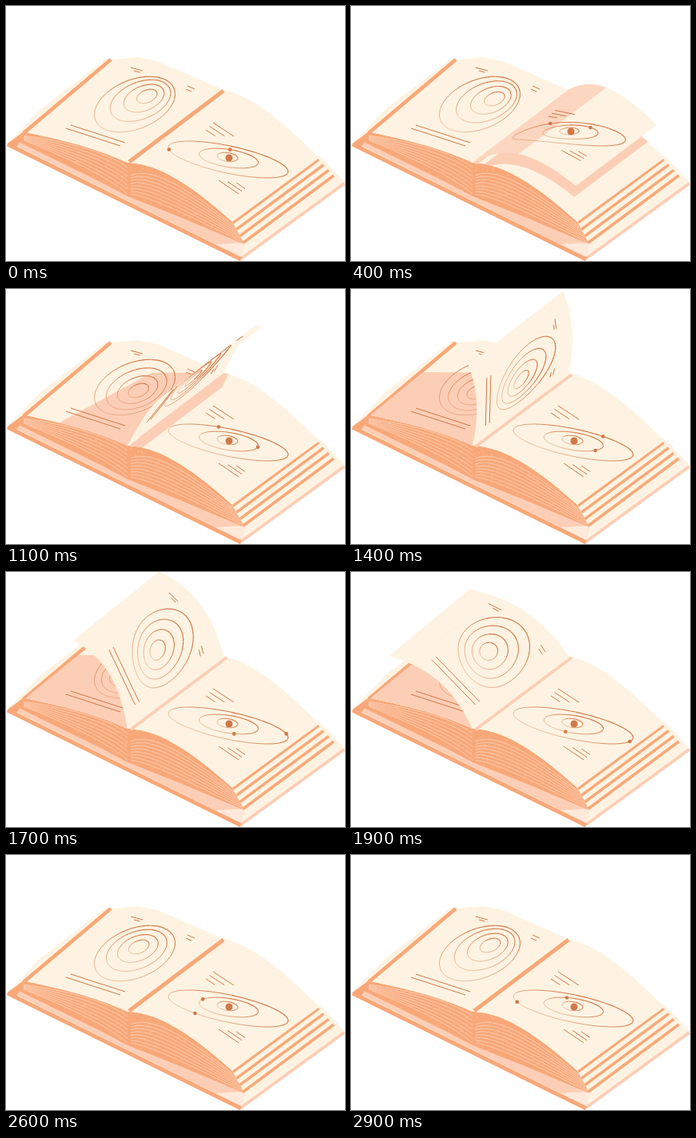
Animation of 424x319 px, one loop 3 s. Source, as an HTML page with a canvas:

```html
<!DOCTYPE html>
<html lang="en">
<head>
<meta charset="utf-8">
<title>Turning page</title>
<style>
  html, body { margin: 0; width: 100%; height: 100%; overflow: hidden; background: #fff; }
  canvas { display: block; width: 424px; height: 319px; }
</style>
</head>
<body>
<canvas id="stage" width="424" height="319"></canvas>
<script>
const ctx = document.getElementById('stage').getContext('2d');
const CREAM = '#fef3e2', ORANGE = '#f8a878', PEACH = '#fcceb6', GLOW = '#fcd6c0', INK = '#d07848';
const LOOP = 3000, STEP = 100, LANDED = 2.1;
const { sin, cos, PI, abs, min, max } = Math;
const RAD = PI / 180;
const FOOT = [152, 196], HEAD = [272, 105];

const range = n => Array.from({ length: n + 1 }, (_, i) => i / n);
const mix = (a, b, k) => a.map((n, i) => n + (b[i] - n) * k);

// The page swings about the spine, speeding up, and bows upwards on the way.
function bend(t) {
  const a = t >= LANDED ? PI : (50 * t + 8.1 * t ** 3) * RAD;
  const s = sin(a), c = cos(a), done = a / PI;
  const reach = abs(c) * (1 + .08 * sin(2 * a));
  const flat = c >= 0 ? [131, 74] : [-128, -38];
  const x = flat[0] * reach, y = flat[1] * reach - (100 + 30 * c * c) * s;
  const bow = 24 - 17 * done + 26 * abs(sin(2 * a));
  const wave = sin(3 * a);
  return {
    knots: [[0, 0], [.2 * x + 8 * s, .2 * y - .55 * bow], [.45 * x + 12 * s, .45 * y - bow], [x, y]],
    side: [109 - 9 * wave, -80 - 11 * done + 6 * wave],
    slip: 1 + .8 * s * done,
    sink: 1 - .1 * s
  };
}

const depth = (p, u) => mix([120, -91], p.side, u);

function at(p, u, v) {
  const k = 1 - u, d = depth(p, u);
  const w = [k ** 3, 3 * k * k * u, 3 * k * u * u, u ** 3];
  return FOOT.map((f, i) => p.knots.reduce((sum, q, j) => sum + w[j] * q[i], f) + v * d[i]);
}

const RIGHT = bend(0), LEFT = bend(LANDED);

// carries a point of a flat page to its place on a bent one
function warp(pt, flat, bent) {
  if (flat === bent) return pt;
  const way = flat === RIGHT ? 1 : -1;
  let lo = 0, hi = 1;
  for (let i = 0; i < 16; i++) {
    const u = (lo + hi) / 2, d = depth(flat, u), b = at(flat, u, 0);
    if ((d[0] * (pt[1] - b[1]) - d[1] * (pt[0] - b[0])) * way > 0) lo = u; else hi = u;
  }
  const v = (pt[0] - at(flat, lo, 0)[0]) / depth(flat, lo)[0];
  return at(bent, lo ** bent.slip, v * bent.sink);
}

function trace(pts) {
  ctx.beginPath();
  pts.forEach(p => ctx.lineTo(p[0], p[1]));
}
function fill(pts, color) {
  trace(pts);
  ctx.closePath();
  ctx.fillStyle = color;
  ctx.fill();
}
function line(pts, color, width) {
  trace(pts);
  ctx.strokeStyle = color;
  ctx.lineWidth = width;
  ctx.stroke();
}
function curve(a, b, c, color, width) {
  line(range(16).map(k => mix(mix(a, b, k), mix(b, c, k), k)), color, width);
}
function clipped(pts, draw) {
  ctx.save();
  trace(pts);
  ctx.clip();
  draw();
  ctx.restore();
}

const edge = (p, v) => range(20).map(u => at(p, u, v));
const outline = p => [...edge(p, 0), ...edge(p, 1).reverse()];

const rightPage = outline(RIGHT);
const leftPage = [...edge(LEFT, 0), [133, 67], [165, 64], [190, 69], HEAD];
const leftFan = [...edge(LEFT, 0).reverse(), [152, 238], [120, 221], [12, 168]];
const rightFan = [...edge(RIGHT, 0), [298, 298], [220, 265], [152, 238]];

function onEllipse([cx, cy, rx, ry, rot], deg) {
  const x = rx * cos(deg * RAD), y = ry * sin(deg * RAD);
  const c = cos(rot * RAD), s = sin(rot * RAD);
  return [cx + x * c - y * s, cy + x * s + y * c];
}

// pen line that thins towards the lower left
function ellipse(shape, put) {
  const pts = range(60).map(k => put(onEllipse(shape, k * 360)));
  for (let i = 0; i < 60; i++) {
    line([pts[i], pts[i + 1]], INK, .8 - .4 * cos((i * 6 - 140) * RAD));
  }
}
function dot(p, r) {
  ctx.beginPath();
  ctx.arc(p[0], p[1], r, 0, 7);
  ctx.fillStyle = INK;
  ctx.fill();
}
function hatch(put, [x, y], [dx, dy], [ox, oy], n, shrink) {
  for (let i = 0; i < n; i++) {
    const k = 1 - shrink * i, a = x + ox * i, b = y + oy * i;
    line([put([a, b]), put([a + dx * k, b + dy * k])], INK, 1);
  }
}

function drawRings(t, page) {
  const put = p => warp(p, LEFT, page);
  const a = (t - .2) / 3 * 2 * PI;
  const dx = 5 + 13 * cos(a) + 4 * sin(a), dy = -2 - 7 * cos(a) + 4 * sin(a);
  for (let i = 0; i < 4; i++) {
    const k = (i / 3) ** .7, r = 53 - 13.2 * i;
    ellipse([161 + dx * k, 123 + dy * k, r, r * .58, -22], put);
  }
  hatch(put, [156, 77], [15, 4], [4, 4], 2, .5);
  hatch(put, [227, 100], [9, 4], [-2, 4], 2, .2);
  hatch(put, [81, 149], [68, 22], [-6, 4], 2, 0);
}

function drawOrbits(page, outer, inner) {
  const put = p => warp(p, RIGHT, page);
  const wide = [278, 192, 76.5, 17, 12], mid = [278.5, 190.5, 37.5, 11, 9];
  ellipse(wide, put);
  ellipse(mid, put);
  ellipse([277, 189, 13, 5.5, 8], put);
  dot(put([279, 190]), 4.5);
  dot(put(onEllipse(wide, outer)), 2.3);
  dot(put(onEllipse(mid, inner)), 2.3);
  hatch(put, [259, 146], [26, 17], [-4.5, 4.5], 3, .28);
  hatch(put, [266, 218], [25, 17], [11, 1.5], 3, .28);
}

function speckle(area, [x, y, w, h], count, color, seed) {
  let s = seed * 7919 + 17;
  const rnd = () => (s = (s * 16807) % 2147483647) / 2147483647;
  clipped(area, () => {
    ctx.fillStyle = color;
    for (let i = 0; i < count; i++) ctx.fillRect(x + rnd() * w, y + rnd() * h, 1, 1);
  });
}

function drawCover(step) {
  const band = [[3, 170], [24, 160], [152, 225], [298, 292], [294, 314]];
  fill([[1, 173], [42, 130], [125, 66], [132, 66], [272, 120], [395, 190], [424, 221], [293, 317]], CREAM);
  fill(band, PEACH);
  speckle(band, [0, 160, 300, 155], 420, '#fde0d0', step + 1);
  fill([[262, 298], [299, 296], [295, 314]], '#fee9da');
  line([[294, 316], [423, 222]], PEACH, 4);
  line([[2, 173], [294, 317]], ORANGE, 5);
  fill([[1, 173], [26, 154], [24, 160], [13, 176]], ORANGE);
}

function drawBlock(step) {
  fill([[283, 269], [392, 189], [411, 212], [298, 298]], CREAM);
  for (const k of range(3)) {
    line([mix([284, 271], [297, 296], k), mix([391, 192], [410, 212], k)], ORANGE, 3.6);
  }
  fill(leftFan, ORANGE);
  fill(rightFan, ORANGE);
  clipped(leftFan, () => {
    for (let i = 0; i < 7; i++) curve([22, 162 + i], [118, 176 + i * 5], [152, 202 + i * 5.5], PEACH, .9);
  });
  clipped(rightFan, () => {
    for (let i = 0; i < 8; i++) curve([156, 212 + i * 3.4], [190 - i * 2, 196 + i * 5.5], [285 + i * 1.6, 275 + i * 3], PEACH, .9);
  });
  speckle(leftFan, [10, 156, 145, 84], 170, '#fbc7a6', step + 40);
  speckle(rightFan, [150, 194, 150, 106], 260, '#fbc7a6', step + 80);
}

function drawShadows(t, page) {
  const k = min(1, max(0, t - .4));
  const near = mix(FOOT, [24, 158], k), far = mix(HEAD, [90, 104], k * k);
  clipped(leftPage, () => fill([FOOT, near, far, HEAD], PEACH));
  if (t < 1.2) {
    const drop = min(18, t * 36);
    clipped(rightPage, () => fill(outline(page).map(([x, y]) => [x - 2, y + drop]), PEACH));
  }
}

function drawTurning(t, page) {
  const n = 32;
  for (let i = 0; i < n; i++) {
    const u = i / n, next = u + 1 / n;
    const color = t < 1.1 && u < t * 1.4 ? GLOW : CREAM;
    const strip = [at(page, u, 0), at(page, next, 0), at(page, next, 1), at(page, u, 1)];
    fill(strip, color);
    line([...strip, strip[0]], color, .6);
  }
  const [x, y] = page.knots[3];
  if (120 * y + 91 * x > 0) drawOrbits(page, 169 + 195 * t, 270 + 110 * t);
  else drawRings(t, page);
}

function draw(step) {
  const t = step * STEP / 1000, moving = t > 0 && t < LANDED;
  const page = bend(t);
  ctx.clearRect(0, 0, 424, 319);
  ctx.lineJoin = 'round';
  drawCover(step);
  drawBlock(step);
  fill(rightPage, CREAM);
  fill(leftPage, CREAM);
  line([[22, 159], [131, 67]], ORANGE, 4.5);

  if (moving) drawShadows(t, page);
  drawRings(t, LEFT);
  if (!moving || t >= .5) {
    const outer = 169 + 120 * t - 43 * max(0, sin(PI * t / 2.25));
    drawOrbits(RIGHT, outer, 270 + 120 * t - 38 * sin(PI * t / 3));
  }
  if (moving) {
    line([[156, 197], [276, 107]], PEACH, 4);
    drawTurning(t, page);
  } else {
    line([[154, 195], [272, 106]], ORANGE, 5);
  }
}

let shown = -1;
function tick() {
  const step = Math.floor(performance.now() % LOOP / STEP);
  if (step !== shown) draw(shown = step);
  requestAnimationFrame(tick);
}
tick();
</script>
</body>
</html>
```
